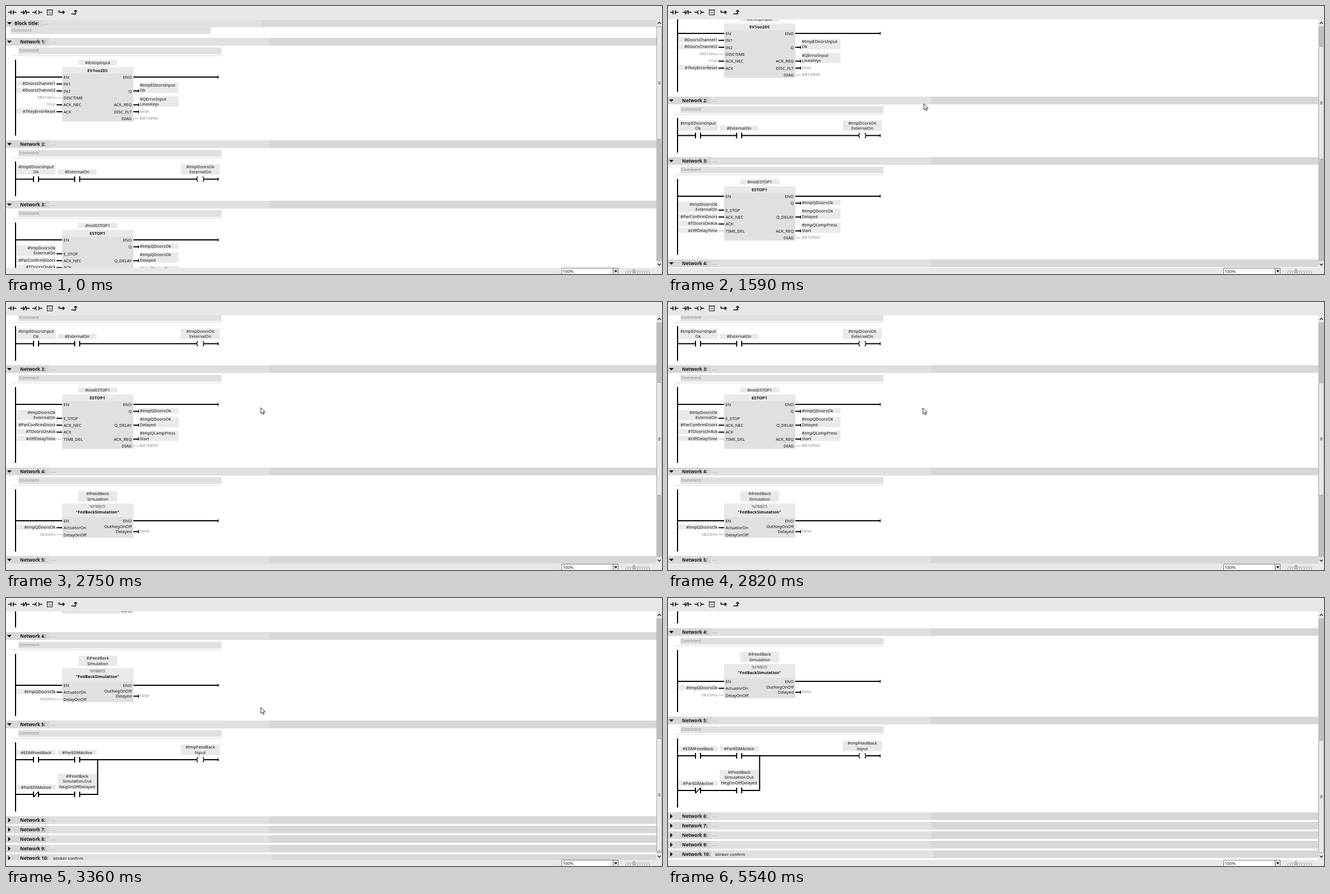
These frames come from a looping animation (1169x479 px, 6290 ms). An HTML page:

```html
<!DOCTYPE html>
<html lang="en">
<head>
<meta charset="utf-8">
<title>Ladder editor</title>
<style>
  html, body { margin: 0; width: 100%; height: 100%; overflow: hidden; background: #fff; }
  svg { display: block; width: 1169px; height: 479px; }
  text { font-family: "Noto Sans", "Open Sans", sans-serif; white-space: pre; }
</style>
</head>
<body>
<svg id="stage" viewBox="0 0 1169 479"></svg>
<script>
const LOOP = 6290, VIEW_TOP = 24, VIEW_END = 468, MAX_SCROLL = 477;
const INK = '#111', PALE = '#8a8a8a', BOX = '#e9e9e9', BODY = '#e0e0e0', BAR = '#d7d7d7', BAR_LIGHT = '#e0e0e0';

// Drawing helpers, all returning markup
const rect = (x, y, w, h, fill) => `<rect x="${x}" y="${y}" width="${w}" height="${h}" fill="${fill}"/>`;
const path = (d, stroke = INK, w = 1.3, fill = 'none') =>
  `<path d="${d}" fill="${fill}" stroke="${stroke}" stroke-width="${w}"/>`;
const fillPath = (d, fill = INK) => `<path d="${d}" fill="${fill}"/>`;
const hLine = (x1, x2, y, color = '#000', w = 2) => rect(x1, y - w / 2, x2 - x1, w, color);
const vLine = (x, y1, y2, w = 2) => rect(x - w / 2, y1, w, y2 - y1, '#000');

// y is the middle of the capitals
function text(x, y, str, { at = 'start', size = 7.45, bold = false, fill = INK } = {}) {
  return `<text x="${x}" y="${y + 2.7}" text-anchor="${at}" font-size="${size}"` +
    ` font-weight="${bold ? 700 : 400}" fill="${fill}">${str}</text>`;
}

// Operand label; y is the middle of the last line
function label(x, y, str, at) {
  const lines = str.split('|'), first = y - 9.3 * (lines.length - 1);
  const tx = { start: x + .5, middle: x + 34.7, end: x + 69.7 }[at];
  return rect(x, first - 4.5, 69.5, y - first + 9.2, BOX) +
    lines.map((s, i) => text(tx, first + 9.3 * i, s, { at })).join('');
}

const dots = (x, y) =>
  `<path d="M${x} ${y}h10" stroke="#a9a9a9" stroke-width="1" stroke-dasharray="1 .7"/>`;

function comment(x, w, y) {
  return rect(x, y - 5.5, w, 12, BAR_LIGHT) + text(x + 1.5, y, 'Comment', { size: 7.7, fill: PALE });
}

function arrow(y, open) {
  return fillPath(open ? `M2 ${y - 2}h8l-4 4.3z` : `M4 ${y - 4}v8l4.3 -4z`, '#000');
}

function network(n, y, open, title) {
  let s = rect(0, y - 7, 1159, 13.7, BAR) + rect(77, y - 7, title ? 397 : 392, 13.7, BAR_LIGHT) +
    arrow(y, open) + text(25, y, `Network ${n}:`, { size: 8.2, bold: true }) +
    (title ? text(84, y, title) : dots(79, y + 1.5));
  if (open) s += comment(22, 362, y + 15.7) + hLine(12, 384, y + 24.8, '#d9d9d9', 1);
  return s;
}

const endRail = (x, y) => hLine(x, 378, y) + vLine(378, y - 2.5, y + 2.5, 1.6);

function contact(x, y, closed) {
  return rect(x - 4, y - 2, 8, 4, '#fff') + vLine(x - 4.5, y - 5, y + 5) + vLine(x + 4.5, y - 5, y + 5) +
    (closed ? path(`M${x - 4} ${y + 4.5}L${x + 4} ${y - 4.5}`, '#000', 1.5) : '');
}

function coil(y) {
  return rect(340, y - 2, 13, 4, '#fff') +
    path(`M341.8 ${y - 4.5}q-3.4 4.5 0 9M350.8 ${y - 4.5}q3.4 4.5 0 9`, '#000', 1.5);
}

// Pins: [row, name, operand, constant operand, pale wire]
function input(y, name, operand, constant, pale) {
  return text(102.5, y, name) + hLine(90, 100, y, pale ? '#a5a5a5' : '#000', pale ? 1 : 2) +
    (constant ? text(88.2, y - 1, operand, { at: 'end', size: 7.7, fill: PALE })
              : label(18.5, y - 1.2, operand, 'end'));
}
function output(y, name, operand, constant, pale) {
  return text(224, y, name, { at: 'end' }) + hLine(227, 236.5, y, pale ? '#a5a5a5' : '#000', pale ? 1 : 2) +
    (pale ? '' : vLine(236.2, y - 2.5, y + 2.5, 1.5)) +
    (constant ? text(238.5, y - 1, operand, { size: 7.7, fill: PALE })
              : label(238, y - 1.2, operand, 'start'));
}

// Function block whose EN row is at y
function block(y, bottom, headTop, titles, ins, outs) {
  const row = k => y + 12.4 * k;
  return rect(100, headTop, 127, bottom - headTop, BODY) + rect(100, headTop, 127, y - 6 - headTop, BOX) +
    titles + hLine(17, 100, y) + endRail(227, y) +
    text(102.5, y, 'EN') + text(224, y, 'ENO', { at: 'end' }) +
    ins.map(([k, ...p]) => input(row(k), ...p)).join('') +
    outs.map(([k, ...p]) => output(row(k), ...p)).join('');
}

function safetyBlock(top, name, type, ins, outs) {
  const titles = label(128.7, top + 37, name, 'middle') +
    text(163, top + 51, type, { at: 'middle', size: 7.6, bold: true });
  return vLine(17, top + 32, top + 167.5) +
    block(top + 63, top + 142.5, top + 45.5, titles, ins, outs);
}

function feedbackBlock(top) {
  const y = top + 88;
  const titles = label(128.7, top + 49, '#iFeedBack|Simulation', 'middle') +
    text(163, top + 62, '%FBB05', { at: 'middle', fill: '#555' }) +
    text(163, top + 72.7, '"FedBackSimulation"', { at: 'middle', size: 7.3, bold: true });
  return vLine(17, top + 32, top + 143) +
    block(y, top + 118.3, top + 57.5, titles,
      [[1, 'ActuatorOn', '#tmpQDoorsOk'], [2, 'DelayOnOff', 't#20ms', true, true]],
      [[1.57, 'Delayed', 'false', true]]) +
    text(224, top + 98.2, 'OutNegOnOff', { at: 'end' });
}

function rung(y, first, second, result) {
  return hLine(17, 340, y) + endRail(353, y) + contact(53.5, y) + contact(126.8, y) + coil(y) +
    label(18.8, y - 13, first, 'middle') + label(92, y - 13, second, 'middle') +
    label(311.5, y - 13, result, 'middle');
}

function sheet() {
  const tops = [64, 247, 355, 538, 696], [n1, n2, n3, n4, n5] = tops;
  let s = rect(0, 0, 1159, 960, '#fff') + rect(0, 24.5, 1159, 13, BAR) + rect(66, 24.5, 390, 13, BAR_LIGHT) +
    arrow(31, true) + text(15, 31, 'Block title:', { size: 8.2, bold: true }) + dots(66, 32.5) +
    comment(8.5, 356.5, 43.5);
  tops.forEach((y, i) => s += network(i + 1, y, true));
  for (let i = 0; i < 5; i++) s += network(6 + i, 867 + 17 * i, false, i === 4 ? 'blinker confirm' : '');

  s += safetyBlock(n1, '#iEstopInput', 'EV1oo2DI',
    [[1, 'IN1', '#DoorsChannel1'], [2, 'IN2', '#DoorsChannel2'], [3, 'DISCTIME', 't#310ms', true, true],
     [4, 'ACK_NEC', 'true', true], [5, 'ACK', '#TKeyErrorReset']],
    [[2, 'Q', '#tmpEDoorsInput|Ok'], [4, 'ACK_REQ', '#QErrorInput|LinesKeys'],
     [5, 'DISC_FLT', 'false', true], [6, 'DIAG', 'B#16#00', true, true]]);

  s += vLine(17, n2 + 31, n2 + 93) +
    rung(n2 + 62.5, '#tmpEDoorsInput|Ok', '#ExternalOn', '#tmpDoorsOk|ExternalOn');

  s += safetyBlock(n3, '#instESTOP1', 'ESTOP1',
    [[2, 'E_STOP', '#tmpDoorsOk|ExternalOn'], [3, 'ACK_NEC', '#ParConfirmDoors'],
     [4, 'ACK', '#TDoorsOnAck'], [5, 'TIME_DEL', '#OffDelayTime', false, true]],
    [[1, 'Q', '#tmpQDoorsOk'], [3, 'Q_DELAY', '#tmpQDoorsOk|Delayed'],
     [5, 'ACK_REQ', '#tmpQLampPress|Start'], [6, 'DIAG', 'B#16#00', true, true]]);

  s += feedbackBlock(n4);

  const low = n5 + 125;
  s += vLine(17, n5 + 32, n5 + 155.5) +
    rung(n5 + 63, '#EDMFeedBack', '#ParEDMActive', '#tmpFeedBack|Input') +
    vLine(163.3, n5 + 63, low + 1) + hLine(17, 163, low) + contact(53.5, low, true) + contact(126.8, low) +
    label(18.8, low - 13, '#ParEDMActive', 'middle') +
    label(92, low - 14, '#iFeedBack|Simulation.Out|NegOnOffDelayed', 'middle');
  return s;
}

function toolbar() {
  return rect(0, 0, 1169, 24, '#e8e8e8') +
    path('M4 11.2h5M13 11.2h5.5M9 7.7v7M13 7.7v7', '#000', 1.6) +
    path('M26 11.2h5M36 11.2h6M31 7.7v7M36 7.7v7M32 14l3 -6', '#000', 1.4) +
    path('M47 11.2h5.5M59 11.2h5.5M54.5 8q-3.5 3.2 0 6.4M57.5 8q3.5 3.2 0 6.4', '#000', 1.4) +
    path('M73.5 7.5h9v8.5h-9zM72 7h12', '#222', 1.1) +
    text(78, 12, '??', { at: 'middle', size: 6 }) +
    path('M94.5 7.5v3.7h9.5M101 8.5l3 2.7l-3 2.7', '#000', 1.4) +
    path('M116.5 14.2h7.5v-5M121.3 10.2l2.7 -2.7l2.7 2.7', '#000', 1.4);
}

function footer() {
  let s = rect(0, 468, 1169, 11, '#e8e8e8') + path('M990.5 480v-11.5h91.5v11.5', '#777', 1, '#fff') +
    text(992, 474.3, '100%', { size: 7.6 }) + path('M1082 480v-11.5h9v11.5', '#777', 1, '#e4e4e4') +
    fillPath('M1083.8 472.5h5.6l-2.8 3.4z', '#000') + hLine(1104, 1147, 474, '#aaa', 1);
  for (let i = 0; i < 11; i++) s += rect(1104 + 4.2 * i, 476, 1, 2, '#777');
  return s + path('M1117.5 471h3v4l-1.5 2l-1.5 -2z', '#777', .8, '#ddd');
}

function scrollbar() {
  return rect(1159, 24, 10, 444, '#bebebe') + rect(1159, 24, 10, 12.5, '#e8e8e8') +
    rect(1159, 456, 10, 12, '#e8e8e8') +
    path('M1161.3 32l2.9 -3l2.9 3M1161.3 460.5l2.9 3l2.9 -3', '#222', 1.3) +
    '<g id="thumb"><rect x="1159.5" y="37" width="9" height="201" rx="1" fill="#e8e8e8" stroke="#999" stroke-width=".8"/>' +
    path('M1162 135.5h4.5M1162 137.5h4.5M1162 139.5h4.5', '#666', 1) + '</g>';
}

const clip = (id, top) => `<clipPath id="${id}">${rect(0, top, 1159, VIEW_END - top, '#000')}</clipPath>`;
const art = sheet();
const stage = document.getElementById('stage');
stage.innerHTML = `<defs>${clip('view', VIEW_TOP)}${clip('tail', 390)}</defs>` +
  `<g clip-path="url(#view)"><g id="sheet">${art}</g></g>` +
  `<g id="stale" clip-path="url(#tail)"><g transform="translate(0 -313)">${art}</g></g>` +
  toolbar() + footer() + scrollbar() +
  '<path id="cursor" d="M0 0V10.6L2.5 8.4L4.2 12.3L5.9 11.5L4.2 7.8H7.6Z" fill="#fff" stroke="#111" stroke-width=".9"/>';

const [sheetEl, staleEl, thumbEl, cursorEl] = ['sheet', 'stale', 'thumb', 'cursor'].map(id => document.getElementById(id));

// [time, scroll, cursor x, cursor y]; no cursor where x is missing
const steps = [[0, 0]];
for (let i = 0; i < 10; i++) {
  const k = (1 - i / 9) ** 2;
  steps.push([310 + 67.8 * i, 0, 456 + 537 * k, 175 + 288 * k]);
}
steps.push(
  [990, 0, 456, 174], [1120, 0, 456, 174.4], [1260, 0, 456, 174.8],
  [1590, 78, 456, 174.8], [1660, 78, 455.6, 178], [1730, 78, 455.2, 181], [1800, 78, 455, 183],
  [2330, 157, 454.6, 184], [2400, 157, 454.6, 184.8], [2470, 157, 454.4, 187],
  [2750, 235, 454.2, 188.8], [2820, 235, 454.2, 189.6],
  [3080, 313, 454.2, 190.5], [3150, 392, 454.2, 191.3], [3220, 392, 454.2, 192.5],
  [3290, 470, 454.2, 194], [3360, 470, 454.2, 195.7], [4220, MAX_SCROLL, 454.2, 195.7]);
for (let i = 1; i <= 6; i++) {
  const k = (i / 6) ** 1.5;
  steps.push([4992 + 78 * i, MAX_SCROLL, 454.2 + 493 * k, 195.7 + 272 * k]);
}
steps.push([5540, MAX_SCROLL]);

const show = (el, on) => el.setAttribute('visibility', on ? 'visible' : 'hidden');
const move = (el, x, y) => el.setAttribute('transform', `translate(${x} ${y})`);

function draw(t) {
  let now = steps[0];
  for (const s of steps) if (s[0] <= t) now = s;
  const [time, scroll, x, y] = now;
  move(sheetEl, 0, -scroll);
  move(thumbEl, 0, scroll * 217.5 / MAX_SCROLL);
  show(staleEl, time === 3150);   // the lower strip repaints one step late
  show(cursorEl, x !== undefined);
  if (x !== undefined) move(cursorEl, x, y);
}

const start = performance.now();
function tick() {
  draw((performance.now() - start) % LOOP);
  requestAnimationFrame(tick);
}
tick();
</script>
</body>
</html>
```
